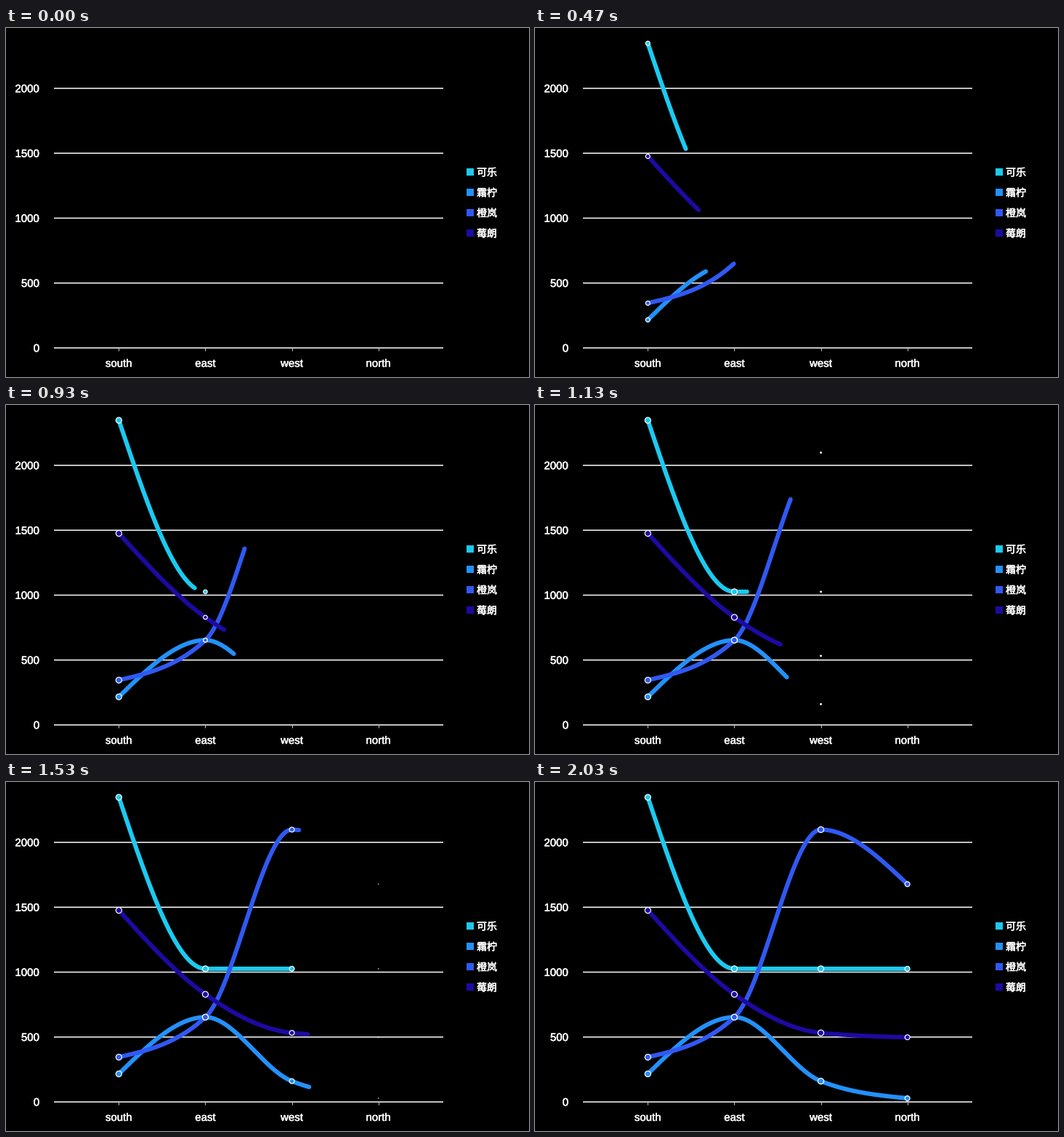
Animation, 720 px wide and 480 px high, one loop 2.06 s. Source, as a matplotlib script:

```python
import numpy as np
import matplotlib.pyplot as plt
from matplotlib.animation import FuncAnimation
from matplotlib.patches import Circle, Rectangle
from matplotlib.patheffects import withStroke

W, H, DPI = 720, 480, 100
PX = 72 / DPI
LOOP, FRAMES = 2060, 62
STEP_MS = 100 / 3
DRAW_MS = 2000      # time to draw a whole line
DOT_MS = 630        # time for a dot to grow
DOT_GAP = 500       # delay between dot columns
DOT_R = 4

LEFT, RIGHT, BASE, TOP = 66, 602, 440, 83
GAP = (RIGHT - LEFT) / 4.5
XS = LEFT + GAP * (0.75 + np.arange(4))
REGIONS = ["south", "east", "west", "north"]

SERIES = [
    ("可乐", "#1bcaf0", (2347, 1026, 1026, 1026)),
    ("霜柠", "#2391fb", (216, 653, 160, 28)),
    ("橙岚", "#3059f3", (345, 653, 2098, 1678)),
    ("莓朗", "#1d0aa2", (1476, 829, 532, 498)),
]


def to_y(value):
    return BASE - np.asarray(value) * (BASE - TOP) / 2000


def tangents(ys):
    """Monotone tangents, in pixels per segment."""
    s = np.diff(ys)
    m = np.zeros(len(ys))
    for i in range(1, len(ys) - 1):
        a, b = s[i - 1], s[i]
        m[i] = (np.sign(a) + np.sign(b)) * min(abs(a), abs(b), abs(a + b) / 4)
    m[0] = (3 * s[0] - m[1]) / 2
    m[-1] = (3 * s[-1] - m[-2]) / 2
    return m


class Curve:
    def __init__(self, values):
        self.ys = to_y(values)
        self.m = tangents(self.ys)
        x, y = self.points(np.linspace(0, 3, 601))
        run = np.concatenate([[0], np.cumsum(np.hypot(np.diff(x), np.diff(y)))])
        # each segment takes a share of time equal to its share of length
        self.knots = run[::200] / run[-1]

    def points(self, q):
        i = np.clip(q.astype(int), 0, 2)
        u = q - i
        y0, y1 = self.ys[i], self.ys[i + 1]
        y = (y0 + (y1 - y0) * u * u * (3 - 2 * u)
             + self.m[i] * u * (1 - u) ** 2 - self.m[i + 1] * u * u * (1 - u))
        return XS[0] + GAP * q, y

    def upto(self, p):
        end = np.interp(p, self.knots, np.arange(4))
        return self.points(np.linspace(0, end, 240))


fig = plt.figure(figsize=(W / DPI, H / DPI), dpi=DPI, facecolor="black")
ax = fig.add_axes([0, 0, 1, 1])
ax.set_xlim(0, W)
ax.set_ylim(H, 0)
ax.axis("off")


def label(x, y, text, size, ha, font="Liberation Sans"):
    ax.text(x, y, text, color="white", fontsize=size * PX, ha=ha, va="baseline",
            family=font, path_effects=[withStroke(linewidth=0.5 * PX, foreground="white")])


for value in range(0, 2001, 500):
    y = to_y(value)
    ax.plot([LEFT, RIGHT], [y, y], color="#f2f2f2", lw=1.6 * PX, snap=False,
            solid_capstyle="butt", zorder=1)
    label(46.3, y + 5.3, str(value), 15, "right")

for x, name in zip(XS, REGIONS):
    ax.plot([x, x], [BASE, BASE + 4], color="#cccccc", lw=PX, zorder=1,
            solid_capstyle="butt")
    label(x, 466, name, 15, "center")

curves, lines, dots = [], [], []
for n, (name, color, values) in enumerate(SERIES):
    y = 198 + 28 * n
    ax.add_patch(Rectangle((634, y - 5), 10, 10, fc=color, lw=0))
    label(648, y + 5.3, name, 14, "left", "Noto Sans CJK JP")

    curve = Curve(values)
    curves.append(curve)
    lines += ax.plot([], [], color=color, lw=6 * PX, zorder=2 + n,
                     solid_capstyle="round", solid_joinstyle="round")
    for col in range(4):
        dot = Circle((XS[col], curve.ys[col]), 0, fc=color, ec="white",
                     lw=1.2 * PX, zorder=10 + n, visible=False)
        ax.add_patch(dot)
        dots.append((col, dot))


def update(frame):
    t = frame * STEP_MS
    for curve, line in zip(curves, lines):
        line.set_data(*curve.upto(min(t / DRAW_MS, 1)))
        line.set_visible(frame > 0)
    for col, dot in dots:
        grow = np.clip((t - DOT_GAP * col) / DOT_MS, 0, 1)
        dot.set_radius(DOT_R * grow)
        dot.set_visible(bool(grow > 0))
    return lines + [dot for _, dot in dots]


anim = FuncAnimation(fig, update, frames=FRAMES, interval=LOOP / FRAMES,
                     init_func=lambda: update(0), repeat=True, repeat_delay=0)
plt.show()
```
